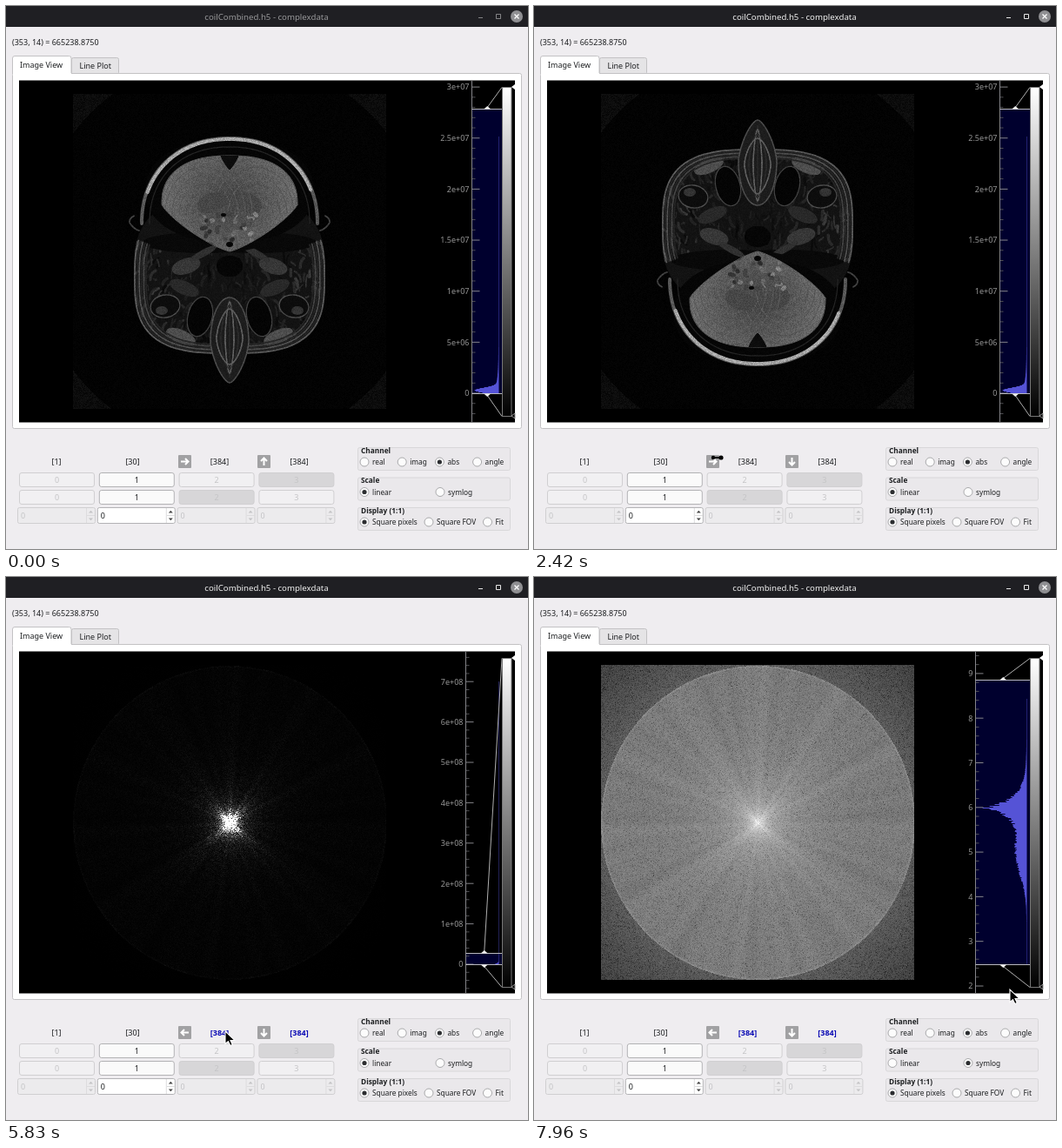
Recreate the animation shown at these times as an HTML page with a canvas. Size 600x624 px, loop 8 s.

```html
<!DOCTYPE html>
<html lang="en">
<head>
<meta charset="utf-8">
<title>Array viewer</title>
<style>
html, body { margin: 0; width: 100%; height: 100%; overflow: hidden; background: #efedf0; }
svg, canvas { position: absolute; left: 0; top: 0; }
canvas { left: 77px; top: 101px; }
text { font: 9px "Noto Sans", "Open Sans", sans-serif; fill: #1d1f21; white-space: pre; }
.mid { text-anchor: middle; }
.end { text-anchor: end; }
.small { font-size: 8.3px; }
.bold { font-weight: bold; }
.title { font-size: 9.65px; }
.axis { fill: #969696; }
.off { fill: #c4c4c6; }
.blue { fill: #0a0ab4; font-weight: bold; }
</style>
</head>
<body>
<svg id="ui" width="600" height="624"></svg>
<canvas id="view" width="360" height="362"></canvas>
<svg width="600" height="624"><g id="cursor"></g></svg>
<script>
const W = 360, H = 362, LOOP = 8000;
const $ = id => document.getElementById(id);
const gray = v => `rgb(${v},${v},${v})`;
const range = n => [...Array(n).keys()];
let seed = 7;
const rnd = () => (seed = (seed * 16807) % 2147483647) / 2147483647;

// ---------- window markup ----------
const text = (x, y, s, cls = '', id = '') => `<text x="${x}" y="${y}" class="${cls}" id="${id}">${s}</text>`;
const rect = (x, y, w, h, fill, stroke = 'none', r = 0) =>
  `<rect x="${x}" y="${y}" width="${w}" height="${h}" rx="${r}" fill="${fill}" stroke="${stroke}"/>`;
const path = (d, stroke, fill = 'none', w = 1) =>
  `<path d="${d}" stroke="${stroke}" fill="${fill}" stroke-width="${w}"/>`;

function icon(x, id) {
  return rect(x, 516, 15, 15, '#a1a1a3', 'none', 1) +
    `<g id="${id}">${path(`M${x + 3} 523.5h8M${x + 8} 520l3.5 3.5l-3.5 3.5`, '#fff', 'none', 2)}</g>`;
}

function radio(x, y, label, id = '', on = false) {
  return `<circle cx="${x}" cy="${y}" r="5" fill="#fcfcfc" stroke="#a9a9ab"/>` +
    `<circle cx="${x}" cy="${y}" r="2.6" fill="#2b2d30" id="${id}" opacity="${on ? 1 : 0}"/>` +
    text(x + 9, y + 3.2, label, 'small');
}

function group(y, label) {
  return rect(404.5, y + .5, 175, 26, '#eae8eb', '#d8d7d9', 2) + text(408, y + 6.5, label, 'small bold');
}

function column(i) {
  const x = 15 + i * 91.8, on = i === 1;
  const ink = on ? '#444' : '#c4c4c6', edge = on ? '#b2b2b4' : '#d0cfd1';
  const button = row => {
    const y = 536 + row * 20, held = i === 3 - row;
    return rect(x + .5, y + .5, 86, 16, held ? '#d7d6d8' : on ? '#fafafa' : '#f1f0f2', edge, 2.5) +
      text(x + 43.5, y + 11.5, i, 'mid ' + (on ? '' : 'off'));
  };
  return button(0) + button(1) + rect(x - 1.5, 576.5, 89, 18, on ? '#fff' : '#ecebed', edge, 2) +
    path(`M${x + 77.5} 577v17M${x + 78} 585.5h9`, '#dddcde') +
    path(`M${x + 80} 582.5l2.5 -2.8l2.5 2.8zM${x + 80} 588.5l2.5 2.8l2.5 -2.8z`, 'none', ink) +
    text(x + 2, 588.7, 0, on ? '' : 'off');
}

// ---------- histogram panels ----------
const fall = (d, scale) => Math.exp(-Math.abs(d) / scale);
const bell = (d, width) => Math.exp(-((d / width) ** 2));
const powers = (n, exp) => range(n).map(k => k ? k + exp : '0');

// "size" is the length of the bar d pixels above the lower bound.
const panels = [
  { x: 535.5, zero: 445, step: 58.65, high: 118.5, from: 150,
    labels: ['0', '5e+06', '1e+07', '1.5e+07', '2e+07', '2.5e+07', '3e+07'],
    size: d => .35 + 23 * bell(d - 4, 4) + 6 * fall(d, 13) },
  { x: 528.5, zero: 445, step: 38.9, high: 337.5, from: 95, labels: powers(10, 'e+07'),
    size: d => .35 + 30 * fall(d, 2.5) + 4 * fall(d, 15) },
  { x: 528.5, zero: 445, step: 46.4, high: 432.5, from: 120, labels: powers(8, 'e+08'),
    size: d => .35 + 10 * fall(d, 1) },
  { x: 507.5, zero: 470, step: 51.3, high: 118.5, from: 140, labels: range(8).map(k => k + 2),
    size: d => .35 + (45 * fall(d - 180, 13) + 12 * bell(d - 127, 35)) * (.85 + .25 * rnd()) }
];

function panel(p, i) {
  const mid = (p.x + 571) / 2, low = 445.5, base = 566.5;
  let bars = `M${base} ${p.from}`, minor = '', major = '';
  for (let y = p.from; y <= 445; y++) bars += `H${(base - p.size(445 - y)).toFixed(1)}v1`;
  for (let k = -5; k < 55; k++) {
    const y = p.zero - k * p.step / 5;
    if (y > 477 || y < 87) continue;
    if (k % 5) minor += `M${p.x} ${y}h4`; else major += `M${p.x} ${y}h9`;
  }
  return `<g id="panel${i}">` + rect(p.x, p.high, 570 - p.x, low - p.high, '#00002e') +
    path(bars + `H${base}z`, 'none', '#5553d6') +
    path(minor, '#505054') + path(major + `M${p.x} 86V478`, '#858589') +
    p.labels.map((l, n) => text(p.x - 3, p.zero - n * p.step + 3.3, l, 'end axis')).join('') +
    path(`M${p.x} ${p.high}H570M${p.x} ${low}H570`, '#b9b9bd') +
    path(`M${mid} ${p.high - 2}L570 93.5h11M${mid} ${low + 2}L570 471.5h11`, '#b0b0b0') +
    path(`M${mid - 4} ${p.high}l4 -3.5l4 3.5zM${mid - 4} ${low}l4 3.5l4 -3.5z`, 'none', '#eee') + '</g>';
}

$('ui').innerHTML =
  rect(0, 0, 600, 24, '#1f1f23') + text(299.5, 16, 'coilCombined.h5 - complexdata', 'title mid', 'title') +
  `<g id="buttons">${path('M543 13.5h5M563.5 9.5h5v5h-5z', '#e8e8e8')}</g>` +
  '<circle cx="587" cy="12" r="7" fill="#8f8f92"/>' + path('M584.5 9.5l5 5m0 -5l-5 5', '#fff', 'none', 1.3) +
  text(7, 45, '(353, 14) = 665238.8750') +
  rect(75.5, 59.5, 54, 19, '#e5e4e6', '#c3c2c4', 2) + rect(7.5, 77.5, 585, 408, '#fff', '#c3c2c4', 2) +
  path('M7.5 78V60q0 -2.5 2.5 -2.5h62.5q2.5 0 2.5 2.5V78', '#c3c2c4', '#fff') + rect(8, 77, 67, 2, '#fff') +
  text(16, 71.3, 'Image View') + text(84.5, 72, 'Line Plot') +
  rect(15, 85.5, 570, 393, '#000') +
  panels.map(panel).join('') +
  '<linearGradient id="ramp" x2="0" y2="1"><stop stop-color="#fff"/><stop offset="1"/></linearGradient>' +
  rect(570.5, 93.5, 10.5, 378, 'url(#ramp)', '#777') +
  path('M581 93l4 -3v6z', 'none', '#fff') + path('M581 471l4 -3v6z', '#999', '#000') +
  text(58, 527, '[1]', 'mid') + text(145.5, 527, '[30]', 'mid') +
  text(245.5, 527, '[384]', 'mid', 'dimA') + text(337, 527, '[384]', 'mid', 'dimB') +
  icon(198, 'arrowA') + icon(289, 'arrowB') + range(4).map(column).join('') +
  group(507, 'Channel') + group(541.5, 'Scale') + group(576, 'Display (1:1)') +
  ['real', 'imag', 'abs', 'angle'].map((s, i) => radio(412 + i * 43.2, 524, s, '', s === 'abs')).join('') +
  radio(412, 558.5, 'linear', 'linear') + radio(499, 558.5, 'symlog', 'symlog') +
  radio(412, 593, 'Square pixels', '', true) + radio(486, 593, 'Square FOV') + radio(553.5, 593, 'Fit');

// ---------- image data ----------
function layer() {
  const c = document.createElement('canvas');
  c.width = W; c.height = H;
  return c.getContext('2d');
}

// Runs fn(dx, dy, old) on each pixel, with offsets from the centre.
function shade(g, fn) {
  const img = g.getImageData(0, 0, W, H), d = img.data;
  for (let i = 0; i < d.length; i += 4) {
    const n = i / 4;
    d[i] = d[i + 1] = d[i + 2] = fn(n % W - W / 2, Math.floor(n / W) - H / 2, d[i]);
    d[i + 3] = 255;
  }
  g.putImageData(img, 0, 0);
  return g.canvas;
}

// Head slice built from superellipses around the midline, y measured on the stage.
function scan() {
  const g = layer();
  g.fillRect(0, 0, W, H);
  g.translate(180, -101);
  g.filter = 'blur(.7px)';
  g.lineCap = 'round';

  const bend = (v, n) => Math.sign(v) * Math.abs(v) ** (2 / n);
  const oval = (x, y, rx, ry, n = 2, low = ry, nLow = n, from = 0, to = 2 * Math.PI) => {
    g.beginPath();
    for (let a = from; a <= to + .001; a += Math.PI / 90) {
      const s = Math.sin(a), k = s > 0 ? nLow : n;
      g.lineTo(x + rx * bend(Math.cos(a), k), y + (s > 0 ? low : ry) * bend(s, k));
    }
  };
  const fill = v => { g.fillStyle = gray(v); g.fill(); };
  const stroke = (v, w) => { g.strokeStyle = gray(v); g.lineWidth = w; g.stroke(); };
  const blob = (v, x, y, rx, ry, turn = 0, edge = 0) => {
    g.beginPath();
    g.ellipse(x, y, rx, ry, turn, 0, 7);
    fill(v);
    if (edge) stroke(edge, 1.3);
  };
  const both = draw => [1, -1].forEach(s => { g.save(); g.scale(s, 1); draw(); g.restore(); });

  // face: layered rim, then muscle fibres that brighten outwards
  oval(0, 310, 110, 90, 3);
  fill(16);
  g.save();
  g.clip();
  both(() => {
    for (let i = 0; i < 230; i++) {
      const x = 108 * rnd(), y = 270 + 125 * rnd(), lean = 12 * rnd() - 4;
      g.beginPath();
      g.moveTo(x, y);
      g.quadraticCurveTo(x + lean, y + 3, x + lean, y + 14 * rnd());
      stroke(6 + (26 + 40 * (x / 108) ** 2) * rnd(), 1 + 2.5 * rnd());
    }
    blob(52, 50, 299, 17, 9, .3);
    blob(38, 52, 324, 18, 8, -.4);
    blob(10, 74, 345, 17, 13, .2, 75);
    blob(48, 78, 350, 7, 5);
    blob(75, 56, 380, 18, 8, -.4);
    blob(6, 30, 272, 70, 12);
    blob(45, 30, 284, 18, 4, .5);
    blob(3, 0, 299, 15, 12);
  });
  g.restore();
  for (let i = 0; i < 6; i++) {
    oval(0, 312, 109 - i * 2.6, 87 - i * 2, 3, undefined, undefined, -.35, Math.PI + .35);
    stroke(i % 2 ? 34 : 88 - i * 6, 1.8);
  }

  // nose and air cavities
  both(() => blob(2, 34, 357, 14, 23, -.25, 62));
  oval(0, 385, 22, 50, 2, 48, 1.5);
  fill(26);
  stroke(75, 1.5);
  for (let i = -3; i <= 3; i++) {
    oval(0, 382, Math.abs(i) * 5, 46 - 4 * Math.abs(i), 1.6, 45 - 5 * Math.abs(i));
    stroke(i % 2 ? 92 : 40, 1.3);
  }

  // skull, scalp and ears
  oval(0, 212, 97, 60, 2.2);
  fill(3);
  oval(0, 250, 92, 88, 2.2, 88, 2.2, Math.PI, 2 * Math.PI);
  stroke(34, 1.2);
  oval(0, 250, 101, 98, 2.15, 98, 2.15, Math.PI, 2 * Math.PI);
  stroke(85, 4);
  oval(0, 250, 100, 97, 2.15, 97, 2.15, Math.PI + .35, 2 * Math.PI - .35);
  stroke(165, 4);
  both(() => {
    oval(104, 248, 11, 8, 2, 10, 1.4, -1, 1.6);
    stroke(62, 1.8);
  });

  // brain with folds around each lobe
  const glow = g.createRadialGradient(0, 225, 8, 0, 225, 82);
  glow.addColorStop(0, gray(66));
  glow.addColorStop(1, gray(108));
  oval(0, 228, 78, 56, 2.4, 54, 1.25);
  g.fillStyle = glow;
  g.fill();
  stroke(88, 1);
  g.save();
  g.clip();
  both(() => {
    for (let i = 1; i < 15; i++) {
      oval(30, 240, i * 4, i * 5, 2, 6, 2, Math.PI, 2 * Math.PI);
      stroke(i % 2 ? 78 : 96, .8);
    }
    blob(68, 20, 226, 18, 11, .4);
    for (let i = 0; i < 22; i++) blob(35 + 95 * rnd(), 34 * rnd(), 238 + 38 * rnd(), 5 * rnd(), 2.5, 3 * rnd());
    oval(0, 172, 11, 4, 2, 17, 1.2);
    fill(10);
    stroke(112, 1);
  });
  g.restore();
  blob(5, -7, 240, 3, 2);
  blob(3, 0, 274, 4, 3);

  return shade(g, (x, y, v) => {
    const r = Math.hypot(x, y), corner = r > 226 ? 9 : 0;
    return v * (.85 + .3 * rnd()) + rnd() * (5 + corner) + corner * .5;
  });
}

function halfTransform() {
  return shade(layer(), (x, y) => {
    const d = Math.abs(y - 1), noise = .15 + 1.7 * rnd() ** 2;
    if (Math.abs(x - 2) > 110) {
      const side = Math.abs(x) > 153 ? 38 : 16;
      return (7 * fall(d, 90) + side * fall(d, 7)) * noise;
    }
    if (d < 1.6) return 255;
    const rough = Math.sin(x * .45) + Math.sin(x * 1.3 + 2) + Math.sin(x * .17);
    const wave = .35 + .9 * Math.abs(Math.sin(d * .85 + 3 * Math.cos(x / 45)));
    const streak = (150 + 45 * rough + .5 * Math.abs(x)) * bell(d - 3, 1.8) * (.6 + .5 * rnd());
    return streak + (75 * fall(d, 20) + 15 * fall(d, 110)) * noise * wave;
  });
}

// Log10 magnitude of the full transform, speckled.
const power = new Float32Array(W * H).map((_, n) => {
  const x = n % W - W / 2, y = Math.floor(n / W) - H / 2, r = Math.hypot(x, y), a = Math.atan2(y, x);
  const speckle = Math.log10(-Math.log(rnd() * .998 + .001)) * .47;
  if (r > 180.5) return 4.75 - (r - 180) / 110 + speckle + .2 * rnd();
  const rays = .05 * (Math.sin(a * 23) + Math.sin(a * 37 + 1) + Math.sin(a * 11));
  const arms = .45 * fall(r, 55) * Math.sin(2 * a) ** 4 + .25 * fall(r, 70) * Math.sin(a) ** 40;
  const rim = r > 178.5 ? .25 : 0;
  return 5.6 + 1.3 * fall(r, 44) + 1.5 * fall(r, 9) + arms + rays + rim + speckle;
});
const spectrum = tone => {
  let n = 0;
  return shade(layer(), () => tone(power[n++]));
};

const images = [
  scan(),
  halfTransform(),
  spectrum(p => 255 * 10 ** p / 2.8e7),
  spectrum(p => 255 * (p - 2.5) / 6.35)
];

// ---------- motion ----------
const arrow = path('M0 0V14.5L3.4 11.6L5.8 16.6L8.3 15.4L6 10.6L10.6 10.2z', '#fff', '#000', 1.1);
const grip = path('M0 0h10', '#000', 'none', 2) + '<circle r="2.2"/><circle cx="9" r="2.6"/>';
const hand = path('M2 1L6 8', '#000', 'none', 3) + rect(2, 5, 9, 7, '#000', 'none', 3);

// Rests of the pointer: arrival, departure, x, y
const rests = [
  [430, 430, 566, 415], [710, 730, 481, 470], [1500, 1960, 294, 522], [2380, 3250, 206, 519],
  [4020, 4480, 333, 520], [4900, 5920, 252, 522], [6420, 7250, 498, 554], [7960, LOOP, 547, 474]
];

function pointer(t) {
  const i = rests.findLastIndex(r => t >= r[0]);
  if (i < 0) return null;
  const [, leave, x, y] = rests[i], [arrive, , x1, y1] = rests[i + 1] || rests[i];
  const u = t > leave ? (t - leave) / (arrive - leave) : 0, e = 1 - (1 - u) ** 3;
  return [x + (x1 - x) * e, y + (y1 - y) * e];
}

const view = $('view').getContext('2d'), cursor = $('cursor');
let shown = '', shape = '';

function showState(active, flipX, flipY, log, mode) {
  $('title').style.fill = active ? '#f2f2f2' : '#98989a';
  $('buttons').style.opacity = active ? 1 : .5;
  $('arrowA').setAttribute('transform', `rotate(${flipX ? 180 : 0} 205.5 523.5)`);
  $('arrowB').setAttribute('transform', `rotate(${flipY ? 90 : -90} 296.5 523.5)`);
  $('dimA').classList.toggle('blue', mode > 1);
  $('dimB').classList.toggle('blue', mode > 0);
  $('linear').setAttribute('opacity', log ? 0 : 1);
  $('symlog').setAttribute('opacity', log ? 1 : 0);
  panels.forEach((_, i) => $('panel' + i).style.display = i === mode ? '' : 'none');
  const sx = flipX && !mode ? -1 : 1, sy = flipY && !mode ? -1 : 1;
  view.setTransform(sx, 0, 0, sy, sx < 0 ? W : 0, sy < 0 ? H : 0);
  view.drawImage(images[mode], 0, 0);
}

const start = performance.now();

function frame() {
  const t = (performance.now() - start) % LOOP;
  const mode = t < 4250 ? 0 : t < 5080 ? 1 : t < 7060 ? 2 : 3;
  const state = [t >= 1710, t >= 2790, t >= 1800, t >= 6880, mode];
  if (state.join() !== shown) {
    shown = state.join();
    showState(...state);
  }
  const p = pointer(t);
  cursor.style.display = p ? '' : 'none';
  if (p) {
    const next = t > 2380 && t < 3250 ? grip : t >= 3250 && t < 4020 ? hand : arrow;
    if (next !== shape) cursor.innerHTML = shape = next;
    cursor.setAttribute('transform', `translate(${Math.round(p[0])} ${Math.round(p[1])})`);
  }
  requestAnimationFrame(frame);
}
frame();
</script>
</body>
</html>
```
